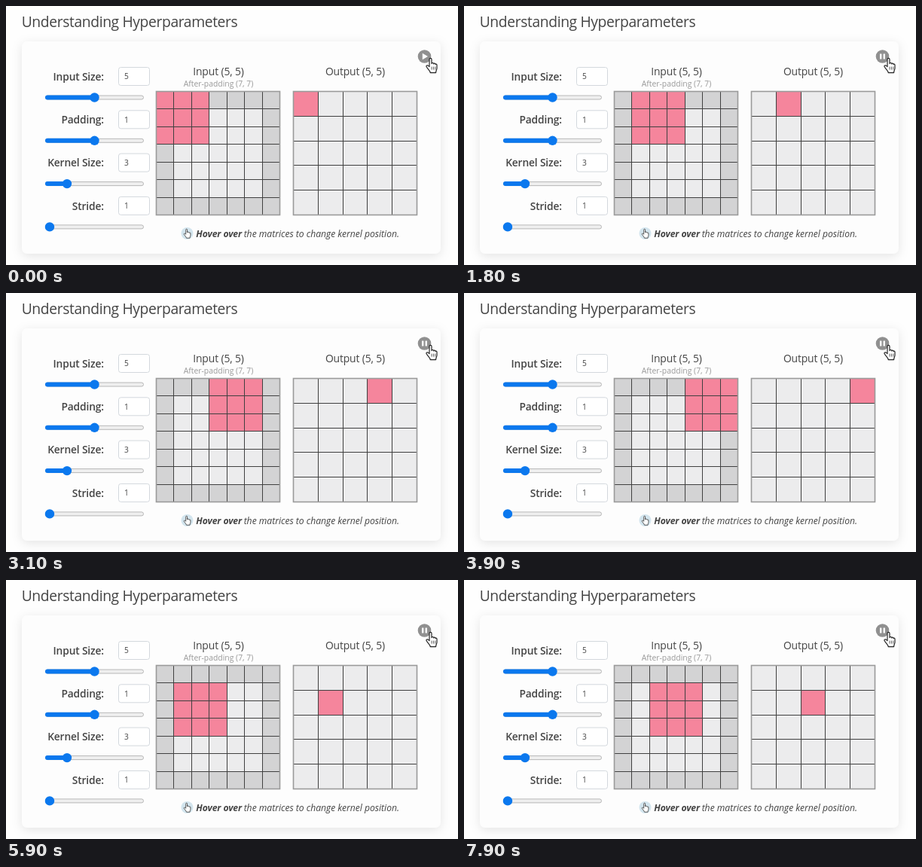
Write an HTML page that moves like this. It is 600 px wide and 344 px high and loops after 8 s.

```html
<!DOCTYPE html>
<html lang="en">
<head>
<meta charset="utf-8">
<title>Understanding Hyperparameters</title>
<style>
  html, body { margin: 0; width: 100%; height: 100%; overflow: hidden; background: #fefefe; }
  svg { display: block; width: 600px; height: 344px; font-family: "Open Sans", "Noto Sans", sans-serif; fill: #444; }
  .card { fill: #fdfdfd; filter: drop-shadow(0 3px 7px rgba(0, 0, 0, .1)); }
  .title { font-size: 19.3px; letter-spacing: -.38px; }
  .label { font-size: 13.8px; font-weight: 600; letter-spacing: -.16px; text-anchor: end; }
  .value { font-size: 10.2px; fill: #444; }
  .box { fill: #fff; stroke: #d3d8dd; }
  .track { fill: #efefef; stroke: #b8b8b8; }
  .blue { fill: #0b78ee; }
  .heading { font-size: 13.9px; letter-spacing: -.13px; text-anchor: middle; }
  .sub { font-size: 10.4px; fill: #999; text-anchor: middle; }
  .hint { font-size: 12.15px; font-style: italic; }
  .hint .strong { font-weight: 700; letter-spacing: -.08px; }
  .pad { fill: #d3d3d4; }
  .cells { fill: #ececed; }
  .lines { fill: none; stroke: #404040; }
  .frame { fill: none; stroke: #9a9a9a; stroke-width: 1.6; }
  .hand { fill: #fff; stroke: #222; stroke-width: 1.2; stroke-linejoin: round; }

  .kernel {
    fill: #f5859c;
    transform: translate(calc(var(--col) * var(--cell)), calc(var(--row) * var(--cell)));
  }
  #matrices { animation: slide 8s step-end infinite; }
  @keyframes slide {
    0%     { --col: 0; --row: 0; }
    12.5%  { --col: 1; --row: 0; }
    23.75% { --col: 2; --row: 0; }
    36.25% { --col: 3; --row: 0; }
    48.75% { --col: 4; --row: 0; }
    61.25% { --col: 0; --row: 1; }
    73.75% { --col: 1; --row: 1; }
    87.5%, 100% { --col: 2; --row: 1; }
  }
  .play, .pause { fill: #fff; animation: show 8s step-end infinite; }
  .play { animation-name: hide; }
  @keyframes show { 0% { opacity: 0; } 10%, 100% { opacity: 1; } }
  @keyframes hide { 0% { opacity: 1; } 10%, 100% { opacity: 0; } }
</style>
</head>
<body>
<svg viewBox="0 0 600 344">
  <defs>
    <path id="hand" d="M5 12V2.3C5 .2 8 .2 8 2.3V8C8 6.4 10.6 6.5 10.6 8.3C10.8 7.1 13 7.4 13 9C13.3 8 15 8.4 15 10V14C15 16 13.6 17 13.6 20H6.3C6 17.4 3.4 15.8 1.2 12.2C.4 10.4 2.4 9.6 3.6 10.8Z"/>
  </defs>

  <text class="title" x="20.7" y="28.2">Understanding Hyperparameters</text>
  <rect class="card" x="21" y="47" width="556" height="282" rx="7"/>
  <g id="controls"></g>

  <text class="heading" x="282" y="92">Input (5, 5)</text>
  <text class="sub" x="282" y="107">After-padding (7, 7)</text>
  <text class="heading" x="463.5" y="92">Output (5, 5)</text>

  <g id="matrices">
    <g transform="translate(199.5 113.5)" style="--cell: 23.43px">
      <rect class="pad" width="164" height="164"/>
      <rect class="cells" x="23.4" y="23.4" width="117.2" height="117.2"/>
      <rect class="kernel" width="70.3" height="70.3"/>
      <path class="lines" data-count="7"/>
      <rect class="frame" width="164" height="164"/>
    </g>
    <g transform="translate(381.5 113.5)" style="--cell: 32.8px">
      <rect class="cells" width="164" height="164"/>
      <rect class="kernel" width="32.8" height="32.8"/>
      <path class="lines" data-count="5"/>
      <rect class="frame" width="164" height="164"/>
    </g>
  </g>

  <circle cx="240.5" cy="302" r="8" fill="#d3e5ee"/>
  <use href="#hand" class="hand" transform="translate(235.6 295.8) scale(.62)"/>
  <g class="hint">
    <text class="strong" x="252.3" y="307.4">Hover over</text>
    <text x="315.7" y="307.4">the matrices to change kernel position.</text>
  </g>

  <circle cx="555.5" cy="67" r="8.8" fill="#909090"/>
  <path class="play" d="M552.8 62.8V71.2L560 67Z"/>
  <path class="pause" d="M552 63.5h2.4v7h-2.4zM556.6 63.5h2.4v7h-2.4z"/>
  <g transform="translate(557 68.6)">
    <use href="#hand" class="hand"/>
    <path d="M8 12v4M10.4 12v4M12.8 12v4" stroke="#333" stroke-width=".8"/>
  </g>
</svg>
<script>
  const size = 164;
  const controls = [
    ["Input Size:", 5, 117.5],
    ["Padding:", 1, 117.5],
    ["Kernel Size:", 3, 81],
    ["Stride:", 1, 58],
  ];

  document.getElementById("controls").innerHTML = controls.map(([label, value, thumb], i) => `
    <g transform="translate(0 ${i * 57.3})">
      <text class="label" x="129.9" y="98.7">${label}</text>
      <rect class="box" x="149.5" y="81.5" width="41" height="24" rx="3"/>
      <text class="value" x="157" y="97.3">${value}</text>
      <rect class="track" x="52.5" y="119" width="130" height="5" rx="2.5"/>
      <rect class="blue" x="52" y="118.5" width="${thumb - 52}" height="6" rx="3"/>
      <circle class="blue" cx="${thumb}" cy="121.5" r="6.2"/>
    </g>`).join("");

  for (const lines of document.querySelectorAll(".lines")) {
    const count = +lines.dataset.count;
    let path = "";
    for (let i = 1; i < count; i++) {
      const at = Math.round(i * size / count);
      path += `M${at} 0V${size}M0 ${at}H${size}`;
    }
    lines.setAttribute("d", path);
  }
</script>
</body>
</html>
```
